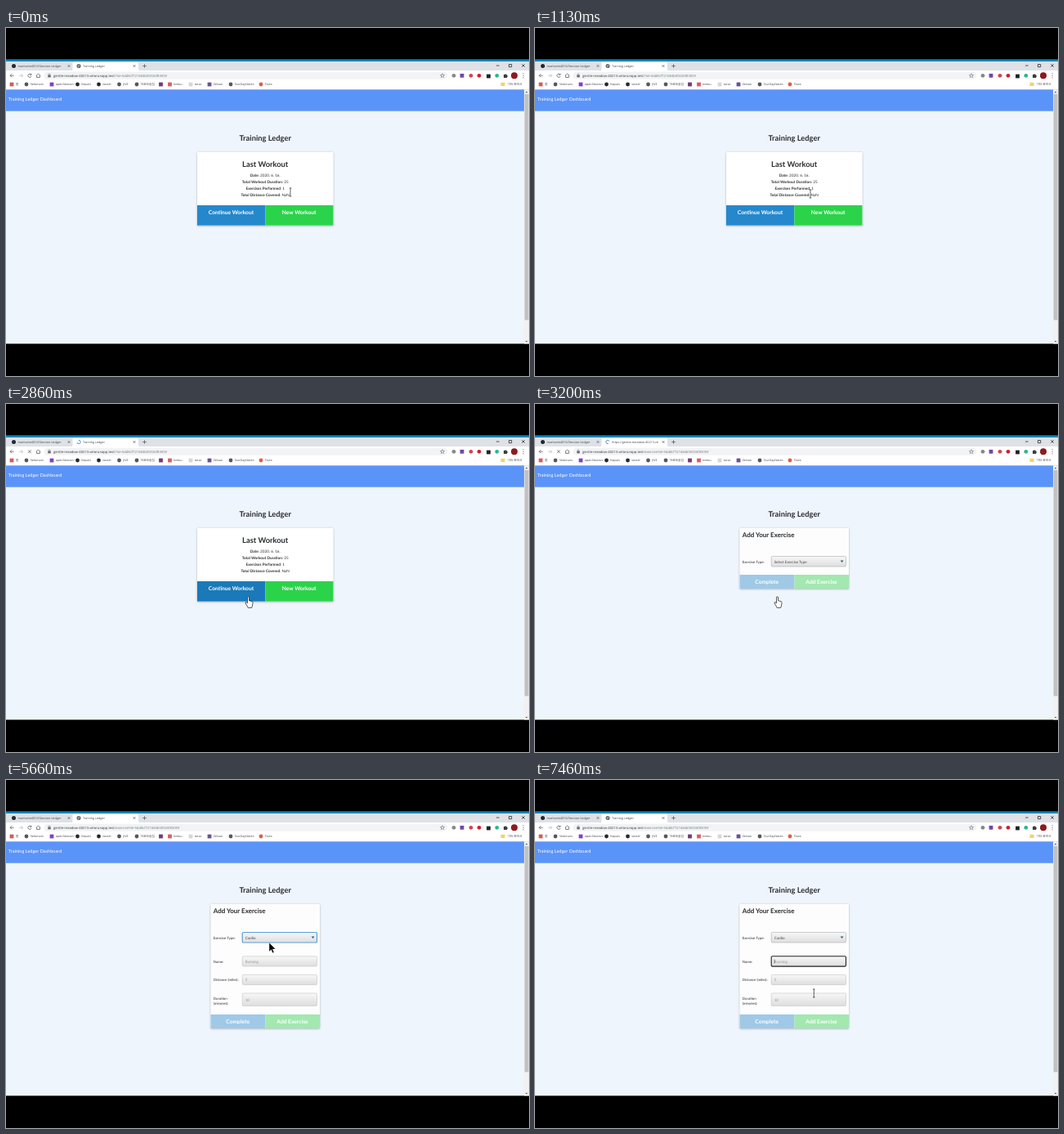
Recreate the animation shown at these times as an HTML page. Size 640 px wide and 426 px high, loop 8000 ms.

```html
<!DOCTYPE html>
<html lang="en">
<head>
<meta charset="utf-8">
<title>Training Ledger</title>
<style>
html, body { margin: 0; width: 100%; height: 100%; overflow: hidden; background: #000; }
svg { display: block; width: 100%; height: 100%; }
text { font-family: Lato, sans-serif; fill: #2a2c2e; text-rendering: geometricPrecision; white-space: pre; }
.ui text { font-family: "Open Sans", "Noto Sans", "Noto Sans CJK KR", "Noto Sans CJK", sans-serif; font-size: 3.75px; fill: #44474b; }
.ui .url { font-size: 4.15px; fill: #303236; }
.ui .dim { fill: #74787c; }
.line { fill: none; stroke: #55585c; stroke-width: .75; }
.b { font-weight: 700; }
.mid { text-anchor: middle; }
.h1 { font-size: 9.33px; font-weight: 700; }
.h2 { font-size: 8px; font-weight: 700; }
.p { font-size: 4.67px; }
.label { font-size: 4.33px; }
.btn { font-size: 6.7px; font-weight: 700; fill: #fff; text-anchor: middle; }
.hint { font-size: 4.5px; fill: #969696; }
.field { fill: url(#field); stroke: #c3c3c3; stroke-width: .6; }
</style>
</head>
<body>
<svg viewBox="0 0 640 426" preserveAspectRatio="none">
  <defs>
    <linearGradient id="field" x2="0" y2="1"><stop stop-color="#f7f7f7"/><stop offset="1" stop-color="#dedede"/></linearGradient>
    <filter id="shadow" x="-10%" y="-10%" width="120%" height="120%">
      <feDropShadow dx="0" dy=".6" stdDeviation=".8" flood-color="#58616b" flood-opacity=".5"/>
    </filter>
  </defs>
  <rect width="640" height="426"/>

  <g class="ui">
    <rect y="38.3" width="640" height="4" fill="#1187bd"/>
    <rect y="41" width="640" height="11.5" fill="#dee1e6"/>
    <path d="M79.500 52.500q2 0 2-2v-7q0-2 2-2h76.500q2 0 2 2v7q0 2 2 2z" fill="#fff"/>
    <rect y="52" width="640" height="23.700" fill="#fff"/>
    <circle cx="9.500" cy="46.500" r="2.500" fill="#24292e"/>
    <text x="14.500" y="48">marlovite4816/Session-Ledger</text>
    <text id="tabTitle" x="94" y="48"></text>
    <g id="globe"><circle cx="89" cy="46.500" r="2.500" fill="#55595e"/><path d="M87.300 46l1.500 .8-.3 1.500M89.500 44.600l-.4 1.200 1.500.8" stroke="#fff" stroke-width=".6" fill="none"/></g>
    <path id="spinner" class="line" d="M89 44.300a2.200 2.200 0 1 1-2.200 2.200" style="stroke:#2b78e4"/>
    <path class="line" d="M75.700 45.200l2.600 2.600m0-2.600l-2.600 2.600M155.700 45.200l2.600 2.600m0-2.600l-2.600 2.600M167.200 46.500h4.600m-2.300-2.300v4.600"/>
    <path class="line" style="stroke:#222" d="M600 46h3.600M615.500 44.500h3.200v3.200h-3.200zM631.300 44.300l3.400 3.400m0-3.400l-3.400 3.400"/>

    <path class="line" d="M9.700 58.300H5.200m2-2.100l-2.100 2.100 2.100 2.100"/>
    <path class="line" style="stroke:#b6b9bc" d="M16 58.300h4.500m-2-2.100l2.100 2.100-2.100 2.100"/>
    <path id="reload" class="line" d="M30.700 57a2.100 2.100 0 1 0 .3 2M31 55.700v1.700h-1.700"/>
    <path id="stop" class="line" d="M27 56.400l3.800 3.800m0-3.800l-3.800 3.800"/>
    <path class="line" d="M36.900 58.300l2.600-2.300 2.600 2.300M37.600 58v2.500h3.800V58"/>
    <rect x="46.500" y="53.800" width="494" height="9" rx="4.500" fill="#f1f3f4"/>
    <rect x="51.300" y="57.600" width="3.400" height="2.700" fill="#5f6368"/>
    <path class="line" style="stroke-width:.5" d="M52 57.700v-.7a1 1 0 0 1 2 0v.7"/>
    <text class="url" x="58" y="59.800">gentle-meadow-40213.velorunapp.test<tspan id="path" class="dim"></tspan></text>
    <path class="line" style="stroke-width:.5" d="M534 55.700l.7 1.700 1.900.1-1.500 1.200.5 1.800-1.600-1-1.600 1 .5-1.800-1.500-1.200 1.900-.1z"/>
    <g id="icons"></g>
    <path d="M609 57h1.400a.8.800 0 0 1 1.600 0h1.200v1.300a.8.800 0 0 1 0 1.600v1.100H609z" fill="#3c4043"/>
    <circle cx="622" cy="58.300" r="4" fill="#8d1a1e"/>
    <path d="M633 55.800h.1m-.1 2.500h.1m-.1 2.500h.1" stroke="#444" stroke-width="1.100" stroke-linecap="round"/>
    <g id="bookmarks"></g>
    <rect x="605.500" y="66.800" width="5" height="4.300" rx=".5" fill="#f4d16c"/>
    <text x="613.500" y="70.300">기타 북마크</text>
  </g>

  <rect y="75.500" width="640" height="311" fill="#eff5fc"/>
  <rect y="75.500" width="634" height="26.200" fill="#5b94f8"/>
  <text x="3" y="89.200" font-size="5.600" style="fill:#fff">Training Ledger Dashboard</text>
  <rect x="634" y="75.500" width="6" height="311" fill="#f1f1f1"/>
  <rect x="634.600" y="81" width="4.800" height="276.500" fill="#c1c1c1"/>
  <path d="M635.600 79.200l1.400-1.600 1.400 1.600zM635.600 383l1.400 1.600 1.400-1.600z" fill="#555"/>
  <text class="h1 mid" x="317.200" y="137.800">Training Ledger</text>

  <g id="summary">
    <rect x="234" y="152" width="166.500" height="89.700" rx="1" fill="#fff" filter="url(#shadow)"/>
    <rect id="continue" x="234" y="217" width="83.300" height="24.700"/>
    <rect x="317.300" y="217" width="83.200" height="24.700" fill="#2bd34a"/>
    <text class="h1 mid" x="317.200" y="169.500">Last Workout</text>
    <g id="stats"></g>
    <text class="btn" x="275.500" y="228">Continue Workout</text>
    <text class="btn" x="358.700" y="228">New Workout</text>
  </g>

  <g id="form">
    <rect id="card" x="250.500" y="152" width="133.500" rx="1" fill="#fdfdfe" filter="url(#shadow)"/>
    <text class="h2" x="253.800" y="162.800">Add Your Exercise</text>
    <text class="label" x="253.800" y="194.500">Exercise Type:</text>
    <rect id="select" class="field" x="289.200" y="186.500" width="91.300" height="12.500" rx="1.300"/>
    <text id="choice" class="hint" x="292.700" y="194.500" style="fill:#444"></text>
    <path d="M373.700 191.600h3.800l-1.900 2.300z" fill="#24617c"/>
    <g id="cardio">
      <text class="label" x="253.800" y="223.800">Name:</text>
      <text class="label" x="253.800" y="246.300">Distance (miles):</text>
      <text class="label" x="253.800" y="269">Duration</text>
      <text class="label" x="253.800" y="275">(minutes):</text>
      <rect id="name" class="field" x="289.200" y="215.800" width="91.300" height="12.300" rx="1.300"/>
      <rect class="field" x="289.200" y="238.400" width="91.300" height="12.300" rx="1.300"/>
      <rect class="field" x="289.200" y="261" width="91.300" height="15.500" rx="1.300"/>
      <text class="hint" x="292.700" y="223.800">Running</text>
      <text class="hint" x="292.700" y="246.300">5</text>
      <text class="hint" x="292.700" y="270.500">10</text>
      <path id="caret" d="M293 219.500v5" stroke="#222" stroke-width=".5"/>
    </g>
    <g id="actions">
      <rect x="250.500" y="209" width="67" height="17" fill="#9fc9e7"/>
      <rect x="317.500" y="209" width="66.500" height="17" fill="#a2e8af"/>
      <text class="btn" x="283.700" y="220">Complete</text>
      <text class="btn" x="350.500" y="220">Add Exercise</text>
    </g>
  </g>

  <g id="cursor">
    <path id="beam" d="M-1.300-5h2.600M0-5v10M-1.300 5h2.600" stroke="#333" stroke-width=".75" fill="none"/>
    <path id="arrow" d="M0 0v11l2.500-2.300 1.700 4 1.800-.8-1.700-3.900h3.500z" stroke="#fff" stroke-width=".4"/>
    <path id="hand" d="M-1 1q0-1.200 1-1.200t1 1.200v3.700l3.600 1q1.200.4 1 1.800l-.7 3.500-.7 2.400H-.4l-1-2.200-2-3.300q-.5-1.400 1-1.300l1.400 1.200z" fill="#fff" stroke="#222" stroke-width=".75"/>
  </g>
</svg>
<script>
const $ = id => document.getElementById(id);
const LOOP = 8000, LOAD = 2600, PAGE = 2870, LOADED = 3260;
const SELECT_CLICK = 4130, CHOSEN = 5660, NAME_CLICK = 7130;
const ID = "id=5dd8cf721684b00026f83059";

// Pointer stops: time, x, y, shape until the next stop
const STOPS = [
  [0, 348, 201, "beam"], [60, 348, 201, "beam"], [860, 339, 204, "beam"],
  [930, 339, 204, "beam"], [1130, 337, 203, "beam"], [1330, 333, 205, "beam"],
  [1530, 333, 205, "arrow"], [1800, 313, 220, "hand"], [2060, 296.5, 236, "hand"],
  [3600, 296.5, 236, "arrow"], [4100, 321, 196, "arrow"], [4330, 322, 199, "arrow"],
  [6800, 322, 199, "arrow"], [7000, 333, 220, "beam"], [7130, 334, 222, "beam"],
  [7460, 341.3, 261, "beam"], [LOOP, 341.3, 261, "beam"]
];

const dot = (x, y, color) => `<circle cx="${x}" cy="${y}" r="2.4" fill="${color}"/>`;
const square = (x, y, color) => `<rect x="${x - 2.4}" y="${y - 2.4}" width="4.8" height="4.800" fill="${color}"/>`;

$("icons").innerHTML =
  dot(548, 58.3, "#85888b") + square(558, 58.3, "#7048a8") + dot(569, 58.3, "#d8434c") +
  dot(579, 58.3, "#cf2029") + square(590.500, 59, "#222") + dot(600.800, 58.3, "#2bb68c");

const BOOKMARKS = [
  [7, square, "#d0605a", "앱"], [25, dot, "#55595e", "Seminars"],
  [56, square, "#7d43c4", "openSession"], [87.500, dot, "#24292e", "Kepuls"],
  [113.500, dot, "#24292e", "vostel"], [138.500, dot, "#55595e", "JIVE"],
  [160, dot, "#55595e", "자료모음집"], [189.500, square, "#713a78", ""],
  [200.500, square, "#d75f5c", "brenu"], [226, square, "#d5d8db", "tutor"],
  [249, square, "#6a5295", "Zelvan"], [275, dot, "#55595e", "OurDayNotes"],
  [312, dot, "#e75b3c", "Tovla"]
];
$("bookmarks").innerHTML = BOOKMARKS.map(([x, icon, color, label]) =>
  icon(x, 69, color) + `<text x="${x + 4.7}" y="70.300">${label}</text>`).join("");

const STATS = [["Date", "2020. 6. 16."], ["Total Workout Duration", "25"],
  ["Exercises Performed", "1"], ["Total Distance Covered", "NaN"]];
$("stats").innerHTML = STATS.map(([label, value], i) =>
  `<text class="p mid" x="317.200" y="${181.7 + i * 8}"><tspan class="b">${label}</tspan>: ${value}</text>`).join("");

const show = (id, on) => { $(id).style.display = on ? "" : "none"; };
const setText = (id, value) => { if ($(id).textContent !== value) $(id).textContent = value; };
const outline = (id, on, color, width) => {
  $(id).style.stroke = on ? color : "";
  $(id).style.strokeWidth = on ? width : "";
};

function movePointer(t) {
  const i = STOPS.findIndex((stop, n) => t < STOPS[n + 1][0]);
  const [t0, x0, y0, shape] = STOPS[i], [t1, x1, y1] = STOPS[i + 1];
  const p = (t - t0) / (t1 - t0), ease = p * p * (3 - 2 * p);
  // A pause keeps the shape of the stop before it
  const x = x0 + (x1 - x0) * ease, y = y0 + (y1 - y0) * ease;
  $("cursor").setAttribute("transform", `translate(${x} ${y})`);
  for (const id of ["beam", "arrow", "hand"]) show(id, id === shape);
  return shape;
}

function draw(t) {
  const shape = movePointer(t);
  const loading = t >= LOAD && t < LOADED, onForm = t >= PAGE, chosen = t >= CHOSEN;

  show("spinner", loading);
  show("globe", !loading);
  show("stop", loading);
  show("reload", !loading);
  $("spinner").setAttribute("transform", `rotate(${t * .5} 89 46.5)`);
  setText("tabTitle", loading && onForm ? "https://gentle-meadow-40213.ve" : "Training Ledger");
  setText("path", (onForm ? "/exercise?" : "/?") + ID);

  show("summary", !onForm);
  show("form", onForm);
  $("continue").setAttribute("fill", shape === "hand" ? "#1a79b9" : "#2688cc");

  show("cardio", chosen);
  show("caret", t >= NAME_CLICK);
  setText("choice", chosen ? "Cardio" : "Select Exercise Type");
  $("card").setAttribute("height", chosen ? 152 : 74);
  $("actions").setAttribute("transform", `translate(0 ${chosen ? 78 : 0})`);
  outline("select", t >= SELECT_CLICK && t < NAME_CLICK, "#5a9edb", 1.2);
  if (t < SELECT_CLICK || t >= NAME_CLICK) outline("select", true, "#a9acae", .6);
  outline("name", t >= NAME_CLICK, "#202124", 1.1);
}

function tick() {
  draw(performance.now() % LOOP);
  requestAnimationFrame(tick);
}
tick();
</script>
</body>
</html>
```
